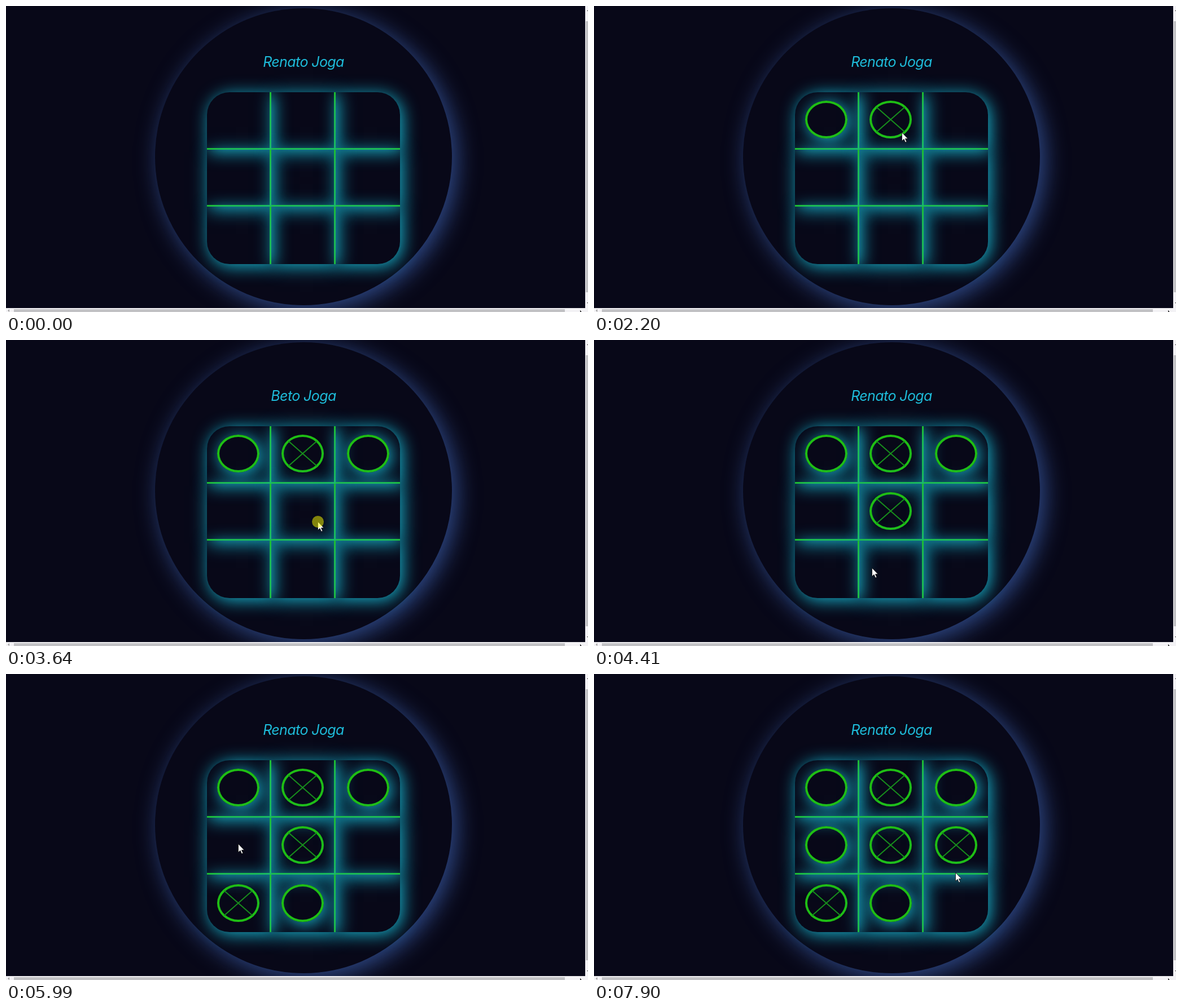
Animation, 1031 px wide and 543 px high, one loop 8000 ms. Source, as an HTML page:

```html
<!DOCTYPE html>
<html lang="pt">
<head>
<meta charset="utf-8">
<title>Jogo da velha</title>
<style>
  :root {
    --bg: #080818; --green: #1fbe14; --teal: rgb(24, 180, 205);
    --glow: 4px 4px 30px var(--teal);
  }
  html, body { margin: 0; width: 100%; height: 100%; overflow: hidden; background: var(--bg); }
  #stage { position: relative; width: 1031px; height: 543px; overflow: hidden; background: var(--bg); }
  #stage > * { position: absolute; }

  .disc {
    left: 264px; top: 4px; width: 526px; height: 527px; border-radius: 50%;
    background: var(--bg); box-shadow: 8px 8px 40px rgb(48, 75, 138);
  }
  #turn {
    left: 327px; top: 84px; width: 400px; text-align: center; white-space: nowrap;
    font: italic 400 25px/30px Inter, "Open Sans", sans-serif;
    font-feature-settings: "cv11"; letter-spacing: -.6px; color: #1ebbd9;
  }

  #board {
    left: 356px; top: 153px; width: 342px; height: 305px;
    display: grid; grid-template: repeat(3, 1fr) / repeat(3, 1fr);
  }
  .cell { position: relative; box-sizing: border-box; box-shadow: var(--glow); }
  .cell:not(:nth-child(3n)) { border-right: 3px solid var(--green); }
  .cell:nth-child(-n+6) { border-bottom: 3px solid var(--green); }
  .cell:nth-child(1) { border-top-left-radius: 40px; }
  .cell:nth-child(3) { border-top-right-radius: 40px; }
  .cell:nth-child(7) { border-bottom-left-radius: 40px; }
  .cell:nth-child(9) { border-bottom-right-radius: 40px; }

  /* the glow spills only up and to the left of its cell */
  .slot {
    position: absolute; inset: -1px 0 0; display: grid; place-items: center;
    clip-path: inset(-40px 0 0 -40px); visibility: hidden;
  }
  .slot.on { visibility: visible; }
  .mark {
    box-sizing: border-box; width: 75px; height: 67px; border-radius: 50%;
    border: 4px solid var(--green);
  }
  .mark.o { box-shadow: var(--glow); }
  .mark svg { display: block; width: 67px; height: 59px; }
  .mark path { stroke: #178c1c; stroke-width: 2; }

  .bar { background: #f3f2f5; }
  .bar.v { left: 1026px; top: 0; width: 5px; height: 543px; }
  .bar.h { left: 0; top: 536px; width: 1031px; height: 7px; }
  .thumb { background: #c1c1c4; }
  .thumb.v { left: 1027px; top: 27px; width: 4px; height: 481px; }
  .thumb.h { left: 14px; top: 538px; width: 976px; height: 5px; }
  .arrows { left: 0; top: 0; }

  #pointer { left: 0; top: 0; width: 0; height: 0; }
  #pointer svg { position: absolute; left: 0; top: 0; }
  #press {
    position: absolute; left: -10.5px; top: -10.5px; width: 21px; height: 21px;
    border-radius: 50%; background: rgba(255, 255, 0, .5);
  }
</style>
</head>
<body>
<div id="stage">
  <div class="disc"></div>
  <div id="turn"></div>
  <div id="board"></div>
  <div class="bar v"></div>
  <div class="bar h"></div>
  <div class="thumb v"></div>
  <div class="thumb h"></div>
  <svg class="arrows" width="1031" height="543">
    <path d="M6 538v5l-3-2.5z" fill="#a3a3a3"/>
    <path d="M1017 539.500v4h3z" fill="#222"/>
    <path d="M1029 9h2v-2zM1029 526h2v2z" fill="#505050"/>
  </svg>
  <div id="pointer">
    <svg width="13" height="20">
      <path d="M.5 .5V15.500L4 12.300 6.500 18 8.800 17 6.400 11.500H11Z" fill="#fff" stroke="#111" stroke-width=".8"/>
    </svg>
    <div id="press"></div>
  </div>
</div>
<script>
  const LOOP = 8000, PRESS = 140, HOLD = 160;
  const players = ['Renato', 'Beto'];

  // the pointer enters, pauses, presses eight cells and moves aside
  const stops = [
    [-90, 966, 536], [730, 543, 294],
    [1360, 442, 212], [2050, 545, 224], [2670, 650, 213], [3620, 552, 322],
    [4460, 492, 404], [5080, 427, 390], [6510, 411, 301], [7400, 627, 345],
    [LOOP, 640, 352]
  ].map(([at, x, y]) => ({ at, x, y }));
  const moves = stops.slice(2, -1);

  const byId = id => document.getElementById(id);
  const board = byId('board'), turn = byId('turn');
  const pointer = byId('pointer'), press = byId('press');

  const cross = '<svg viewBox="-33.5 -29.5 67 59"><path d="M-25 -22 25 22M25 -22-25 22"/></svg>';
  const cells = Array.from({ length: 9 }, () => {
    const cell = document.createElement('div');
    cell.className = 'cell';
    return board.appendChild(cell);
  });
  const cellAt = ({ x, y }) =>
    cells[Math.floor((x - 356) / 114) + 3 * Math.floor((y - 153) * 3 / 305)];

  // noughts and crosses alternate
  const slots = moves.map((move, i) => {
    const slot = document.createElement('div');
    slot.className = 'slot';
    slot.innerHTML = i % 2 ? `<div class="mark">${cross}</div>` : '<div class="mark o"></div>';
    return cellAt(move).appendChild(slot);
  });

  // each glide starts after the hold, eases out and lasts longer over more distance
  function pointerAt(t) {
    const i = Math.max(1, stops.findIndex(s => s.at + HOLD > t));
    const a = stops[i - 1], b = stops[i];
    const dx = b.x - a.x, dy = b.y - a.y;
    const time = Math.min(720, 200 + 1.7 * Math.hypot(dx, dy));
    const left = 1 - Math.min(1, Math.max(0, (t - a.at - HOLD) / time));
    const k = 1 - left ** 4;
    return [a.x + dx * k, a.y + dy * k];
  }

  function draw(t) {
    const placed = moves.filter(m => t >= m.at + PRESS / 2).length;
    slots.forEach((slot, i) => slot.classList.toggle('on', i < placed));
    const label = players[placed % 2] + ' Joga';
    if (turn.textContent !== label) turn.textContent = label;

    const [x, y] = pointerAt(t);
    const pressed = moves.some(m => t >= m.at && t < m.at + PRESS);
    pointer.style.display = t < stops[0].at + HOLD ? 'none' : 'block';
    pointer.style.transform = `translate(${x}px, ${y}px)`;
    press.style.display = pressed ? 'block' : 'none';
  }

  const start = performance.now();
  function tick() {
    draw((performance.now() - start) % LOOP);
    requestAnimationFrame(tick);
  }
  tick();
</script>
</body>
</html>
```
